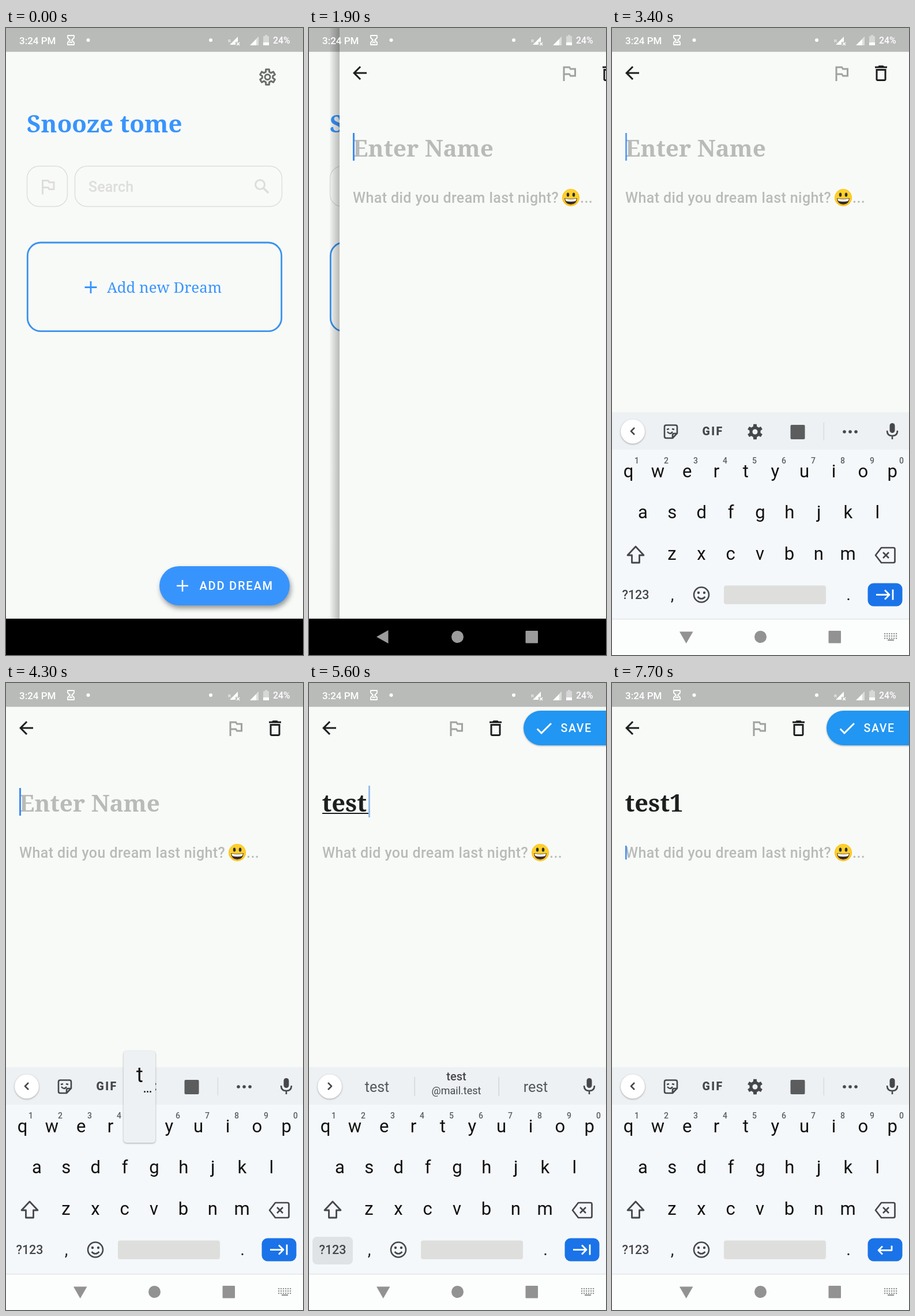
These frames come from a looping animation (515x1087 px, 8000 ms). An HTML page:

```html
<!DOCTYPE html>
<html lang="en">
<head>
<meta charset="utf-8">
<title>Dream diary</title>
<style>
html, body { margin: 0; width: 100%; height: 100%; overflow: hidden; background: #f8faf8; }
svg { display: block; width: 100%; height: 100%; font-family: Roboto, sans-serif; }
.m { font-weight: 500; }
.b { font-weight: 700; }
.x { font-weight: 900; }
.c { text-anchor: middle; }
.slab { font-family: "Noto Serif", serif; }
.line { fill: none; stroke-linejoin: round; }
.lift { filter: drop-shadow(2px 5px 4px #0006); }
.low { filter: drop-shadow(0 1px 1.5px #0005); }
</style>
</head>
<body>
<svg id="stage" viewBox="0 0 515 1087"></svg>
<script>
const LOOP = 8000, STEP = 100;
const BG = '#f8faf8', BLUE = '#3894fd', HINT = '#b9bbb9', PALE = '#dddedc', INK = '#45474a', BLACK = '#1d1f1e';

const text = (x, y, s, size, fill, cls = '', gap = 0) =>
  `<text x="${x}" y="${y}" font-size="${size}" fill="${fill}" class="${cls}" letter-spacing="${gap}">${s}</text>`;
const rect = (x, y, w, h, fill, r = 0, extra = '') =>
  `<rect x="${x}" y="${y}" width="${w}" height="${h}" rx="${r}" fill="${fill}" ${extra}/>`;
const oval = (x, y, rx, ry, fill, extra = '') =>
  `<ellipse cx="${x}" cy="${y}" rx="${rx}" ry="${ry}" fill="${fill}" ${extra}/>`;
const disc = (x, y, r, fill, extra) => oval(x, y, r, r, fill, extra);
const fill = (d, color, extra = '') => `<path d="${d}" fill="${color}" ${extra}/>`;
const line = (d, color, w) => `<path d="${d}" class="line" stroke="${color}" stroke-width="${w}"/>`;
const pen = (color, w) => `stroke="${color}" stroke-width="${w}"`;
const move = (x, y, s) => `<g transform="translate(${x} ${y})">${s}</g>`;
const icon = (x, y, d, color) => fill(d, color, `fill-rule="evenodd" transform="translate(${x} ${y}) scale(1.5)"`);
const fade = (a, s) => `<g opacity="${a}">${s}</g>`;

// last value whose start time has passed
const at = (track, t) => track.filter(k => k[0] <= t).pop()[1];

const FLAG = 'M14 6l-1-2H5v17h2v-7h5l1 2h7V6h-6zm4 8h-4l-1-2H7V6h5l1 2h5v6z';
const BIN = 'M6 19c0 1.1.9 2 2 2h8c1.1 0 2-.9 2-2V7H6v12zM8 9h8v10H8V9zm7.5-5l-1-1h-5l-1 1H5v2h14V4h-3.5z';
const BACK = 'M20 11H7.83l5.59-5.59L12 4l-8 8 8 8 1.41-1.41L7.83 13H20v-2z';
const CHECK = 'M9 16.17L4.83 12l-1.42 1.41L9 19 21 7l-1.41-1.41z';

function gear(x, y, outer, inner) {
  const pts = [];
  for (let k = 0; k < 6; k++)
    for (const [deg, r] of [[-19, inner], [-12, outer], [12, outer], [19, inner]]) {
      const a = (k * 60 + deg) * Math.PI / 180;
      pts.push((x + r * Math.sin(a)).toFixed(1) + ' ' + (y - r * Math.cos(a)).toFixed(1));
    }
  return 'M' + pts.join('L') + 'z';
}

function statusBar() {
  const w = '#fff';
  return rect(0, 0, 515, 41.3, '#000', 0, 'opacity=".255"')
    + text(23, 28, '3:24 PM', 17, w, 'm')
    + line('M107 13h11v4l-4 4 4 4v4h-11v-4l4-4-4-4zM110 26l2.5-2 2.5 2', w, 1.8)
    + disc(142.5, 21, 3, w) + disc(355, 21, 3, w)
    + text(385, 25, 'R', 8, w) + fill('M388 29L402 15V24H398V29z', w)
    + line('M400 25l5 5m0-5l-5 5', w, 1.5)
    + fill('M423 30L438 15V30z', w) + fill('M434 19L438 15V30H434z', '#dcdddc')
    + rect(446, 14, 10, 15, '#d6d7d6', 1) + rect(449, 12, 4, 3, '#d6d7d6') + rect(446, 25, 10, 5, w)
    + text(463, 27, '24%', 15.8, w, 'm');
}

function home() {
  return rect(0, 0, 515, 1024, BG)
    + line(gear(453.5, 85, 13.6, 9.4), '#6c6e6c', 3) + disc(453.5, 85, 4.5, 'none', pen('#6c6e6c', 3))
    + text(36, 181, 'Snooze tome', 42, BLUE, 'slab b')
    + rect(36.5, 239.5, 70, 70, 'none', 21, pen(PALE, 1.4))
    + icon(54.5, 257, FLAG, PALE)
    + rect(119.5, 239.5, 359, 70, 'none', 21, pen(PALE, 1.4))
    + text(143, 284, 'Search', 25, PALE, 'm', .1)
    + disc(440.5, 271.5, 8, 'none', pen(PALE, 3)) + line('M446 277l9 9', PALE, 3.5)
    + rect(37.3, 372, 440.4, 153.7, 'none', 23, pen('#3a92ee', 2.8))
    + line('M136.5 449.5h21m-10.5-10.5v21', BLUE, 2.8)
    + text(175, 459, 'Add new Dream', 25.8, BLUE, 'slab')
    + rect(266, 933, 226, 68, BLUE, 34, 'class="lift"')
    + line('M296 967h20m-10-10v20', '#fff', 2.5)
    + text(335.5, 974, 'ADD DREAM', 20, '#fff', 'm', 1.8);
}

const emoji = (x, y) => move(x, y, disc(0, 0, 15, '#fcc21b') + disc(0, -1, 13.5, '#ffd02b')
  + oval(-5, -5, 2.3, 3.5, '#2f2f2f') + oval(5, -5, 2.3, 3.5, '#2f2f2f')
  + fill('M-11 1q11 2 22 0q-1 11-11 11t-11-11z', '#3b2a26')
  + fill('M-10 1.800q10 2 20 0l-1.500 4.200q-8.500 2-17 0z', '#fff'));

const CARET_X = [23, 41, 64, 82, 103, 120];
const TYPED = [[0, 0], [4400, 1], [4700, 2], [4900, 3], [5200, 4], [6700, 5]];
const CARET = [[0, 1], [2400, .5], [2500, 0], [3000, .5], [3100, 1], [3400, .8], [3500, .3], [3600, 0],
  [4000, .5], [4100, 1], [5600, .5], [5700, 0], [6100, .3], [6200, .7], [6300, 1], [7300, 0], [7500, 1]];
const SAVE = [[0, 0], [4400, .15], [4500, .6], [4600, .9], [4700, 1]];

function editor(t) {
  const n = at(TYPED, t), p = at(SAVE, t), x = CARET_X[n], body = t >= 7600;
  let s = rect(0, 0, 515, 1024, BG) + icon(17, 60, BACK, BLACK)
    + move(-143 * p, 0, icon(380, 60.5, FLAG, '#a0a2a0') + icon(448.5, 60.5, BIN, BLACK));
  if (p) s += move(143 * (1 - p), 0, rect(372, 48, 180, 60, '#2196f3', 30, 'class="low"')
    + icon(389.5, 60.5, CHECK, '#fff') + text(436.5, 85, 'SAVE', 19.5, '#fff', 'm', 1.6));
  s += n ? text(22.5, 223, 'test1'.slice(0, n), 41.5, BLACK, 'slab b')
    : text(23, 223, 'Enter Name', 40.5, HINT, 'slab b');
  if (n && !body) s += rect(23, 225, x - 23, 2, BLACK);
  s += text(23, 303, 'What did you dream last night?', 25, HINT, 'm', .4) + emoji(401, 294)
    + text(417, 303, '...', 25, HINT, 'm', .4);
  const caret = body ? rect(23, 282, 2.5, 24, '#3d8af5')
    : n ? rect(x, 178, 3, 55, '#3d86e0') : rect(23, 182, 3, 48, '#3d8af5');
  return s + fade(at(CARET, t), caret);
}

const WORDS = [[0, null], [4500, ['to', 'the', 'this']], [4700, ['tes', 'tea', 'test']], [4900, ['tes', 'test', 'rest']],
  [5300, ['test', 'test@mail.test', 'rest']], [6800, ['test1', 'test 1', 'tests']], [7600, null]];
const POPUP = [[0, null], [4300, ['t', 231.5]], [4400, null], [4600, ['e', 129]], [4700, null],
  [5100, ['t', 231.5]], [5200, null], [6600, ['1', 29]], [6800, null]];

function strip(words) {
  const mic = rect(481.5, 685, 9, 17, INK, 4.5) + line('M477 698q0 9 9 9t9-9M486 707v6', INK, 2.6);
  let s = rect(0, 666, 515, 65, '#eef1f3') + disc(36, 699.5, 21, '#fff', 'class="low"')
    + line(words ? 'M33 693l6 6-6 6' : 'M39 693l-6 6 6 6', INK, 2.6) + mic;
  if (words) {
    const [left, mid, right] = words, [user, host] = mid.split('@');
    return s + rect(182.5, 683, 1.5, 33, '#d3d6d8') + rect(328.5, 683, 1.5, 33, '#d3d6d8')
      + text(118, 709, left, 25, '#55585a', 'c') + text(393, 709, right, 25, '#55585a', 'c')
      + (host ? text(255.5, 689, user, 20, INK, 'c m') + text(255.5, 713, '@' + host, 18, INK, 'c')
        : text(255.5, 709, mid, 24.5, '#26282a', 'c b'));
  }
  return s + line('M94 688.500h16q3 0 3 3v11l-8 8.500h-11q-3 0-3-3v-16.500q0-3 3-3zM113 703h-5q-3 0-3 3v5', INK, 2.6)
    + line('M95 696l4-1m5 0l4 1M96 700q5 6 9 0', INK, 2.4)
    + text(156.5, 706, 'GIF', 19.5, INK, 'x', 2.4)
    + fill(gear(248, 700, 13.5, 9.7), INK) + disc(248, 700, 4.5, '#eef1f3')
    + rect(309.5, 688, 25, 25, '#5a5c5e', 2) + rect(366.5, 684, 1.5, 31, '#d9dcde')
    + [403, 413, 423].map(x => disc(x, 700, 2.8, INK)).join('');
}

const row = (keys, x, y, size = 31) =>
  keys.map((k, i) => text(x + 50.85 * i, y, k, size, '#111', 'c')).join('');

function keyboard(t) {
  const symbols = t >= 5900 && t < 7600, popup = at(POPUP, t);
  let s = rect(0, 666, 515, 360, '#f5f8fa') + strip(at(WORDS, t));
  if (t >= 5600 && t < 5900) s += rect(6, 960, 70, 48, '#dfe3e6', 8);
  if (symbols) {
    s += row([...'1234567890'], 29, 781, 32)
      + row(['@', '#', '₹', '_', '&amp;', '-', '+', '(', ')', '/'], 28, 853, 30)
      + row([...'*"\':;!?'], 104.5, 925, 30)
      + text(41, 920, '=\\&lt;', 21, INK, 'c m') + text(41, 990, 'ABC', 20.5, INK, 'c m')
      + text(155, 980, '1 2', 17, INK, 'c m') + text(155, 999, '3 4', 17, INK, 'c m');
  } else {
    s += row([...'qwertyuiop'], 28.5, 778.5) + row([...'asdfghjkl'], 53.5, 850) + row([...'zxcvbnm'], 104, 922)
      + [...'1234567890'].map((k, i) => text(43 + 51 * i, 755, k, 14, '#5c5f62', 'c m')).join('')
      + line('M41 899l14 15h-7.5v13h-13v-13h-7.5z', INK, 2.8)
      + text(41, 990, '?123', 21.5, INK, 'c m')
      + disc(155, 982.5, 13, 'none', pen(INK, 2.6))
      + disc(150, 979, 2.2, INK) + disc(160, 979, 2.2, INK) + line('M148.5 986q6.5 7 13 0', INK, 2.6);
  }
  s += line('M467 901h21q2.5 0 2.5 2.5v21q0 2.5-2.5 2.5h-21l-10-13zM470 909l10 10m0-10l-10 10', INK, 2.7)
    + text(104.5, 992, ',', 29, '#222', 'c') + text(410, 992, '.', 29, '#222', 'c')
    + rect(194, 966.5, 177, 32.5, '#dedfdd', 4)
    + rect(443.5, 962.5, 60, 40, t >= 7500 && t < 7600 ? '#155fc4' : '#1a73e8', 10)
    + line(t < 7600 ? 'M458 982.5h23m-8-8l8 8-8 8M487 973.5v18' : 'M485 975.5v8h-23m7-7l-7 7 7 7', '#fff', 2.8);
  if (popup) {
    const [key, x] = popup;
    s += rect(x - 27.5, 638, 55, 159, '#eef1f3', 5, 'class="low"') + text(x + .5, 692, key, 36, '#111', 'c')
      + [9, 14, 19].map(d => disc(x + d, 708.5, 1.5, '#222')).join('');
  }
  return s;
}

function navBar(dark, alpha) {
  const c = dark ? '#9b9b9b' : '#929292';
  let s = disc(257.5, 1055.5, 10.5, c) + rect(375.5, 1045, 21.5, 21.5, c, 1)
    + fill(dark ? 'M117 1055.5l20.5-11.5v23z' : 'M117 1046.5h23.5l-11.8 20.5z', c);
  if (!dark) {
    for (let y = 0; y < 3; y++)
      for (let x = 0; x < 6; x++) s += rect(472 + 4 * x, 1049 + 4 * y, 2.2, 2.2, c);
    s += rect(478, 1060, 11, 2.2, c);
  }
  return rect(0, 1024, 515, 63, dark ? '#000' : '#fcfdfd')
    + (dark ? '' : rect(0, 1024, 515, 1.5, '#e4e7e8')) + fade(alpha, s);
}

function scene(t) {
  let s = '';
  if (t < 2100) s += home();
  if (t >= 1900) {
    const x = at([[1900, 53], [2000, 4], [2100, 0]], t);
    if (x) s += rect(x - 17, 0, 17, 1024, 'url(#shade)');
    s += move(x, 0, editor(t));
  }
  s += statusBar();
  if (t >= 2000) s += move(0, t < 2100 ? 130 : 0, keyboard(t));
  return s + navBar(t < 2000, at([[0, 0], [1300, .5], [1400, 1]], t));
}

const stage = document.getElementById('stage');
const defs = '<defs><linearGradient id="shade"><stop stop-opacity=".02"/><stop offset="1" stop-opacity=".26"/></linearGradient></defs>';
let shown = -1;
function tick() {
  const t = Math.floor(performance.now() % LOOP / STEP) * STEP;
  if (t !== shown) stage.innerHTML = defs + scene(shown = t);
  requestAnimationFrame(tick);
}
tick();
</script>
</body>
</html>
```
